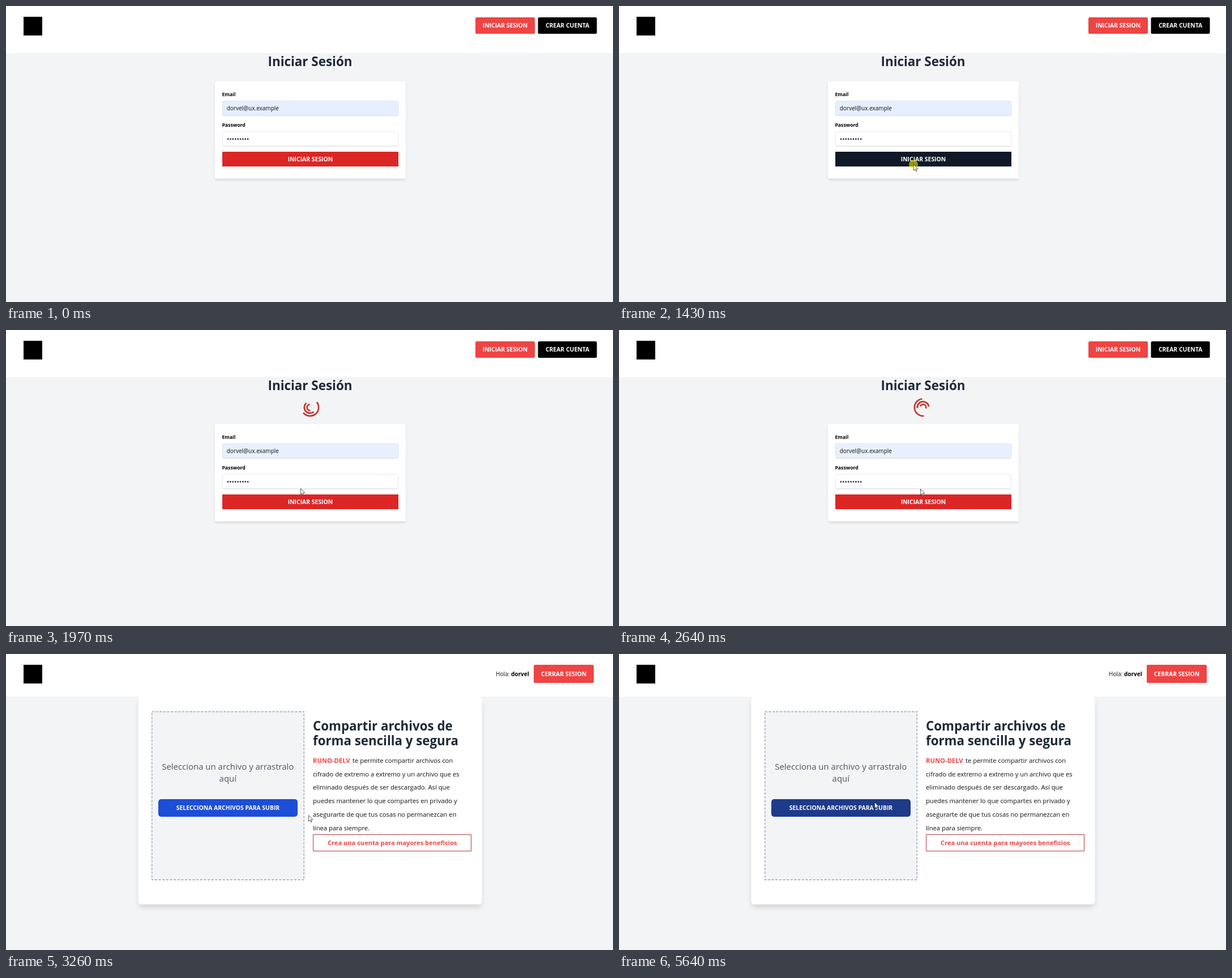
Recreate the animation shown at these times as an HTML page with a canvas. Size 1072 by 522 pixels, loop 5.79 s.

```html
<!DOCTYPE html>
<html lang="es">
<head>
<meta charset="utf-8">
<title>Iniciar Sesión</title>
<style>
  html, body { margin: 0; width: 100%; height: 100%; overflow: hidden; background: #f3f4f6; }
  canvas { display: block; }
</style>
</head>
<body>
<canvas id="stage" width="1072" height="522"></canvas>
<script>
const ctx = document.getElementById('stage').getContext('2d');
const LOOP = 5790, STEP = 68;
const CLICK = 1430, LOADING = 1570, HOME = 2700, SIGNED_IN = 3260;
const FONT = '"Open Sans", "Noto Sans", sans-serif';
const GRAY = '#f3f4f6', INK = '#1f2937', RED = '#ef4444';
const ARROW = new Path2D('M0 0V16L3.7 12.5 6.3 18.5 8.7 17.5 6.1 11.6H11.2Z');

// Page layout of the login form
const FORM = { x: 382, w: 311, top: 133, rowGap: 54 };

const easeOut = k => 1 - (1 - k) ** 2;
const smooth = k => k * k * k * (k * (6 * k - 15) + 10);

const ENTRY = { x: 1002, y: 514 };
const MOVES = [
  { start: 120, end: 680, x: 581, y: 327, ease: easeOut },
  { start: 680, end: 1160, x: 520, y: 279, ease: easeOut },
  { start: 2040, end: 2570, x: 532, y: 280, ease: smooth },
  { start: 2640, end: 2840, x: 534, y: 284, ease: smooth },
  { start: 4772, end: 5110, x: 457, y: 264, ease: smooth },
  { start: 5270, end: 5454, x: 444, y: 254, ease: smooth },
  { start: 5454, end: 5640, x: 451, y: 261, ease: smooth }
];

// The picture refreshes in steps, counted from a given moment
const held = (t, start) => start + Math.floor((t - start) / STEP) * STEP;

function pointerAt(t) {
  let p = ENTRY;
  for (const m of MOVES) {
    if (t < m.start) break;
    const k = t >= m.end ? 1 : m.ease((held(t, m.start) - m.start) / (m.end - m.start));
    p = { x: p.x + (m.x - p.x) * k, y: p.y + (m.y - p.y) * k };
  }
  return p;
}

const inside = (p, x, y, w, h) => p.x > x && p.x < x + w && p.y > y && p.y < y + h;

function box(x, y, w, h, color, r = 0) {
  ctx.fillStyle = color;
  ctx.beginPath();
  ctx.roundRect(x, y, w, h, r);
  ctx.fill();
}

function outline(x, y, w, h, color, width, r = 0) {
  const inset = width / 2;
  ctx.strokeStyle = color;
  ctx.lineWidth = width;
  ctx.beginPath();
  ctx.roundRect(x + inset, y + inset, w - width, h - width, r);
  ctx.stroke();
}

// A white panel whose shadow falls straight down
function panel(x, y, w, h, r, depth) {
  ctx.save();
  ctx.shadowColor = 'rgba(0,0,0,0.14)';
  ctx.shadowBlur = depth * 1.6;
  ctx.shadowOffsetY = depth;
  const inset = depth / 4;
  box(x + inset, y + inset, w - 2 * inset, h - 2 * inset, '#fff', r);
  ctx.restore();
  box(x, y, w, h, '#fff', r);
}

function text(str, x, y, size, color, weight = 400, align = 'left') {
  ctx.font = `${weight} ${size}px ${FONT}`;
  ctx.textAlign = align;
  ctx.fillStyle = color;
  ctx.fillText(str, x, y);
}

function button(label, x, y, w, h, color, r = 0) {
  box(x, y, w, h, color, r);
  text(label, x + w / 2, y + h / 2 + 3.9, 10.4, '#fff', 700, 'center');
}

function header(height, signedIn) {
  box(0, 0, 1072, height, '#fff');
  box(31, 19, 33, 33, '#000');
  if (signedIn) {
    text('Hola:', 865, 38.7, 10, '#111');
    text('dorvel', 892, 38.7, 10, '#000', 700);
    button('CERRAR SESION', 932, 19, 106, 32, RED, 2.6);
  } else {
    button('INICIAR SESION', 829, 20, 105, 29, RED, 2.6);
    button('CREAR CUENTA', 939.5, 20, 104, 29, '#000', 2.6);
  }
}

function halfRing(radius, degrees) {
  const mid = degrees * Math.PI / 180;
  ctx.beginPath();
  ctx.arc(537, 136.5, radius, mid - Math.PI / 2, mid + Math.PI / 2);
  ctx.stroke();
}

function spinner(t) {
  const turn = held(t, LOADING) * 0.18 - 450;
  ctx.strokeStyle = '#c0392b';
  ctx.lineWidth = 2.7;
  halfRing(15.1, 158 + turn);
  halfRing(10.2, 246 + turn);
  halfRing(5.4, 323 - 2 * turn);
}

function field(label, row, fill) {
  const y = FORM.top + 34 + row * FORM.rowGap;
  text(label, FORM.x - 0.6, y - 8, 8.7, '#000', 700);
  panel(FORM.x, y, FORM.w, 26, 2.6, 1);
  box(FORM.x, y, FORM.w, 26, fill, 2.6);
  outline(FORM.x, y, FORM.w, 26, '#dfe3e9', 0.7, 2.4);
  return y;
}

function loginForm(loading, p) {
  const { x, w, top } = FORM;
  panel(x - 13.3, top, w + 26.6, 171.5, 2.6, 2.6);

  const emailY = field('Email', 0, loading ? '#e8f0fe' : '#e6efff');
  text('dorvel@ux.example', x + 7.7, emailY + 17, 10, '#111');

  const passY = field('Password', 1, '#fff');
  for (let i = 0; i < 9; i++) {
    box(x + 8.7 + i * 4.38, passY + 12.3, 2.7, 2.7, '#1f1f45', 1.35);
  }

  const buttonY = top + 124;
  const hover = inside(p, x, buttonY, w, 26);
  button('INICIAR SESION', x, buttonY, w, 26, hover ? '#111827' : '#dc2626');
}

function loginPage(t, p) {
  const loading = t >= LOADING;
  const shift = loading ? 33 : 0;
  header(83, false);
  text('Iniciar Sesión', 537, 106, 22.4, INK, 700, 'center');
  if (loading) spinner(t);
  ctx.save();
  ctx.translate(0, shift);
  loginForm(loading, { x: p.x, y: p.y - shift });
  ctx.restore();
}

function dropZone(p) {
  const center = 391.8;
  box(257, 101, 270, 298, GRAY);
  ctx.setLineDash([4, 2.65]);
  outline(257, 101, 270, 298, '#9ca3af', 1.4);
  ctx.setLineDash([]);
  text('Selecciona un archivo y arrastralo', center, 204.2, 14.95, '#4b5563', 400, 'center');
  text('aquí', center, 225.2, 14.95, '#4b5563', 400, 'center');
  const hover = inside(p, 269, 256, 246, 31);
  button('SELECCIONA ARCHIVOS PARA SUBIR', 269, 256, 246, 31, hover ? '#1e3a8a' : '#1d4ed8', 5);
}

function pitch() {
  const left = 542, first = 191.8, leading = 23.76;
  text('Compartir archivos de', left, 135, 22.3, INK, 700);
  text('forma sencilla y segura', left, 161.4, 22.3, INK, 700);
  text('RUNO-DELV', left, first, 11.23, RED, 700);
  const lines = [
    'te permite compartir archivos con',
    'cifrado de extremo a extremo y un archivo que es',
    'eliminado después de ser descargado. Así que',
    'puedes mantener lo que compartes en privado y',
    'asegurarte de que tus cosas no permanezcan en',
    'línea para siempre.'
  ];
  lines.forEach((line, i) => text(line, i ? left : left + 70, first + i * leading, 11.23, '#111'));
  outline(left, 318, 280, 30, '#b23b3b', 1);
  text('Crea una cuenta para mayores beneficios', left + 140.3, 337.4, 11.1, RED, 700, 'center');
}

function homePage(t, p) {
  header(75, t >= SIGNED_IN);
  panel(233.5, 75, 607, 366.5, 5, 6.6);
  dropZone(p);
  pitch();
}

function pointer({ x, y }, pressed) {
  if (pressed) box(x - 8, y - 7.5, 16, 16, 'rgba(255,255,0,0.55)', 8);
  ctx.save();
  ctx.translate(x + 0.5, y + 0.5);
  ctx.scale(0.66, 0.66);
  ctx.fillStyle = '#fff';
  ctx.fill(ARROW);
  ctx.strokeStyle = '#1c1c24';
  ctx.lineWidth = 1.1;
  ctx.stroke(ARROW);
  ctx.restore();
}

function draw() {
  const t = performance.now() % LOOP;
  const p = pointerAt(t);
  box(0, 0, 1072, 522, GRAY);
  if (t < HOME) loginPage(t, p);
  else homePage(t, p);
  if (t >= MOVES[0].start) pointer(p, t >= CLICK && t < LOADING);
  requestAnimationFrame(draw);
}
draw();
</script>
</body>
</html>
```
